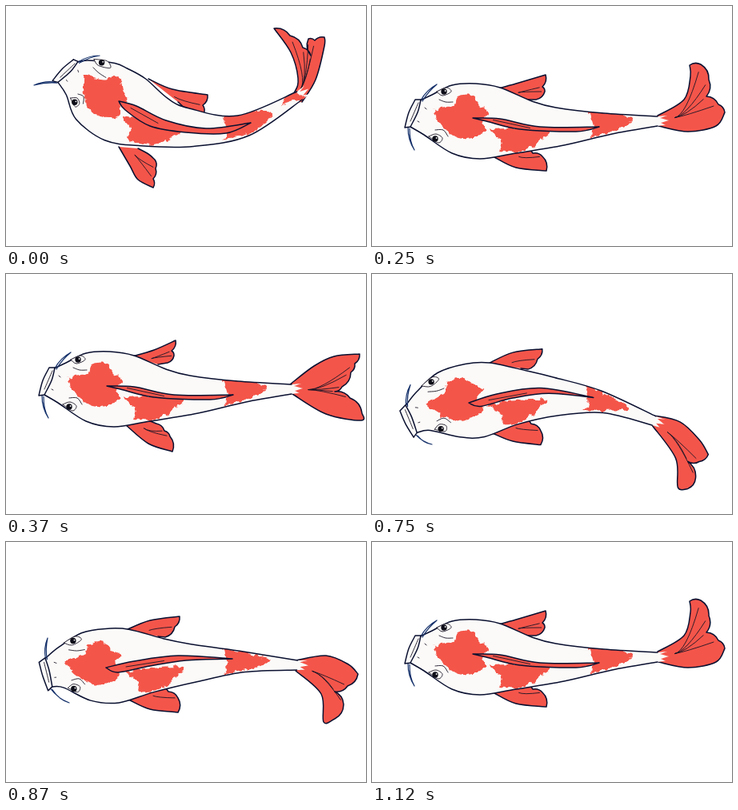
Recreate the animation shown at these times as an HTML page. Size 450 by 300 pixels, loop 1.25 s.

```html
<!DOCTYPE html>
<html lang="en">
<head>
<meta charset="utf-8">
<title>Swimming koi</title>
<style>
html, body { margin: 0; width: 100%; height: 100%; overflow: hidden; background: #fff; }
svg { display: block; width: 100%; height: 100%; }
path { fill: none; stroke-linecap: round; stroke-linejoin: round; }
.ink { stroke: #0a1030; stroke-width: 1.5; }
.thin { stroke: #1b1626; stroke-width: .9; }
.hair { stroke: #14306a; stroke-width: 1.2; }
.red { fill: #f4554a; }
.white { fill: #fbfaf8; }
.pupil { fill: #0d0d18; }
.pose { visibility: hidden; animation: 1250ms step-end infinite; }
.up { animation-name: up; }
.rise { animation-name: rise; }
.lift { animation-name: lift; }
.flat { animation-name: flat; }
.dip { animation-name: dip; }
.down { animation-name: down; }
@keyframes up { 0% { visibility: visible } 9.6%, to { visibility: hidden } }
@keyframes rise { 0% { visibility: hidden } 9.6% { visibility: visible } 20%, to { visibility: hidden } }
@keyframes lift { 0%, 29.6% { visibility: hidden } 20%, 89.6% { visibility: visible } to { visibility: hidden } }
@keyframes flat { 0%, 49.6% { visibility: hidden } 29.6%, 80% { visibility: visible } 89.6%, to { visibility: hidden } }
@keyframes dip { 0%, 60% { visibility: hidden } 49.6%, 69.6% { visibility: visible } 80%, to { visibility: hidden } }
@keyframes down { 0% { visibility: hidden } 60% { visibility: visible } 69.6%, to { visibility: hidden } }
</style>
</head>
<body>
<svg id="stage" viewBox="0 0 450 300">
  <defs>
    <filter id="rough" x="-10%" y="-10%" width="120%" height="120%">
      <feTurbulence type="fractalNoise" baseFrequency=".13" numOctaves="2" seed="4"/>
      <feDisplacementMap in="SourceGraphic" scale="8" xChannelSelector="R" yChannelSelector="G"/>
      <feGaussianBlur stdDeviation=".6"/>
    </filter>
  </defs>
</svg>
<script>
// "x y" pairs; "/" marks a corner, "|" starts a new stroke.
// The body is described once on a straight fish and bent along each pose's spine.
const body = {
  top: '60 118 75 111 100 99 130 97 160 102 200 119 230 127 290 134 357 138',
  tip: '369 137/360 140/371 143/361 146/367 149',
  low: '357 150 300 160 240 174 180 184 135 191 100 184 65 161 48 151',
  lips: '54 117 61 117/57 133 48 151/41 152/46 133 54 117',
  spots: '77 130 101 124 106 115 122 112 135 124 146 134 137 141 141 156 125 165 108 165 93 156 82 143 77 130' +
    '|147 154 180 153 222 156 207 171 188 181 162 181 162 170 147 154' +
    '|270 130 325 140 304 156 272 163 277 156 270 130',
  eyes: '81 107 88 112 99 107 93 102 81 107|71 163 80 160 88 165 83 171 71 163',
  pupils: '90 107 79 166',
  folds: '84 117 92 120 101 120|79 155 89 155 95 163|66 127 68 129|57 144 59 145|48 144 58 121'
};
// Fins and tails run clockwise: leading side / scalloped edge / trailing side.
const up = {
  spine: '72 80 85 89 104 101 135 122 206 148 290 151 333 138 367 112',
  tail: '346 123 361 107 365 90 356 58 335 28/355 37 371 52 381 62 378 41 386 43 398 39/398 50 387 92 370 120',
  upper: '178 91 208 104 252 111/246 124 247 135/232 134 215 120',
  under: '165 178 178 185 186 192/187 203 184 216 184 227/165 217 155 200 141 176',
  dorsal: '141 119 163 125 200 143 250 153 306 146/275 159 225 158 180 150 149 130 141 119',
  whiskers: '117 62 35 99',
  patch: '345 123 358 106 370 112 374 119 358 119 345 123'
};
const rise = {
  spine: '53 113 67 121 89 128 129 141 207 154 287 157 335 147 379 118',
  tail: '364 125 380 112 385 90 373 43/385 47 394 71 405 62 413 57 424 63 432 70/432 77 405 102 380 126',
  upper: '163 101 190 97 226 92/223 106 220 117/205 119 185 113',
  under: '172 186 186 187/190 196 198 202 201 220/175 213 143 188',
  dorsal: '130 133 165 140 220 150 302 150/260 156 190 155 148 146 130 133',
  whiskers: '93 85 22 142'
};
const flat = {
  spine: '48 134 65 137 90 141 130 144 210 150 290 148 325 146 357 144',
  tail: '355 138 385 115 410 103 442 100/436 112 431 123 420 141 411 147 430 155 445 174/444 183 400 175 358 150',
  upper: '158 103 185 95 212 83/207 96 210 102 202 111/190 113',
  under: '178 183 188 187/198 196 205 203 208 222/178 212 150 189',
  dorsal: '126 140 160 141 210 151 284 151/255 157 185 154 143 144 126 140',
  whiskers: '81 98 53 180'
};
const lift = {
  ...flat,
  tail: '357 137 390 117 398 88 397 74/411 73 421 92 418 113 433 123 441 133/430 150 395 157 358 150',
  upper: '158 103 180 97 217 86/213 101 216 107 205 117/195 117',
  under: '198 180 201 184/213 188 218 206/180 202 153 189'
};
const dip = {
  spine: '48 167 63 160 90 157 130 155 210 151 290 150 327 153 364 154',
  tail: '362 148 400 142 428 153 440 165/427 180 411 187 422 203 411 221/397 225 394 190 362 161',
  upper: '150 110 180 98 217 93/211 106 199 119/190 118',
  under: '198 180 203 187/215 195 215 213/180 209 155 198',
  dorsal: '125 157 160 149 215 142 283 146/225 148 180 155 140 163 125 157',
  whiskers: '52 120 79 201'
};

const same = p => p;
// Curls head and tail downward around the middle of the body.
const curl = ([x, y]) => {
  const d = (x - 190) ** 2;
  return [x - 4 - (x > 190 ? d * .00025 : 0), y + d * .00097];
};
const lerp = (a, b, t) => [a[0] + (b[0] - a[0]) * t, a[1] + (b[1] - a[1]) * t];
const at = p => p.map(v => v.toFixed(1)).join(' ');

function pairs(text, warp) {
  const n = text.match(/\d+/g).map(Number), out = [];
  for (let i = 0; i < n.length; i += 2) out.push(warp([n[i], n[i + 1]]));
  return out;
}

// Bezier handles of a Catmull-Rom segment.
function handles(p, i) {
  const a = p[i], b = p[i + 1], before = p[i - 1] || a, after = p[i + 2] || b;
  return [a, [0, 1].map(k => a[k] + (b[k] - before[k]) / 6),
    [0, 1].map(k => b[k] - (after[k] - a[k]) / 6), b];
}

const spline = p => p.slice(1).map((_, i) => 'C' + handles(p, i).slice(1).map(at).join(' ')).join('');

const curve = (text, warp) => text.split('|').map(stroke => {
  let pen, d = '';
  for (const part of stroke.split('/')) {
    const p = pairs(part, warp);
    if (pen) p.unshift(pen);
    else d = 'M' + at(p[0]);
    d += spline(p);
    pen = p[p.length - 1];
  }
  return d;
}).join('');

function along(knots, i, t) {
  const [a, b, c, d] = handles(knots, i);
  const ab = lerp(a, b, t), bc = lerp(b, c, t), cd = lerp(c, d, t);
  const l = lerp(ab, bc, t), r = lerp(bc, cd, t);
  return { p: lerp(l, r, t), angle: Math.atan2(r[1] - l[1], r[0] - l[0]) };
}

const rest = pairs(flat.spine, same);
function bend(knots) {
  return ([x, y]) => {
    let i = 0;
    while (i < rest.length - 2 && x > rest[i + 1][0]) i++;
    const t = Math.min(1, Math.max(0, (x - rest[i][0]) / (rest[i + 1][0] - rest[i][0])));
    const from = along(rest, i, t), to = along(knots, i, t);
    const turn = to.angle - from.angle, c = Math.cos(turn), s = Math.sin(turn);
    const dx = x - from.p[0], dy = y - from.p[1];
    return [to.p[0] + dx * c - dy * s, to.p[1] + dx * s + dy * c];
  };
}

function fin(text, warp) {
  const [lead, edge, trail] = text.split('/').map(part => pairs(part, warp));
  const tip = lead[lead.length - 1], end = edge[edge.length - 1];
  let pen = tip, shape = 'M' + at(lead[0]) + spline(lead);
  for (const e of edge) {
    const m = lerp(pen, e, .5);
    shape += 'Q' + at([m[0] + (e[1] - pen[1]) * .3, m[1] - (e[0] - pen[0]) * .3]) + ' ' + at(e);
    pen = e;
  }
  shape += spline([end, ...trail]);
  const mid = p => p[p.length >> 1];
  const base = lerp(lead[0], trail[trail.length - 1], .5);
  const bow = lerp(mid(lead.slice(0, -1)), trail.length > 1 ? mid(trail.slice(0, -1)) : trail[0], .5);
  const rays = edge.slice(0, -1).map(e =>
    'M' + at(lerp(base, bow, .6)) + 'Q' + at(bow) + ' ' + at(lerp(bow, e, .85))).join('');
  return `<path class="red ink" d="${shape}"/><path class="thin" d="${rays}"/>`;
}

function draw(name, pose, warp = same) {
  const rig = bend(pairs(pose.spine, warp));
  const path = (cls, text, by = rig) => `<path class="${cls}" d="${curve(text, by)}"/>`;
  const skin = [body.top, body.tip, body.low].join('/');
  const pupils = pairs(body.pupils, rig).map(([x, y]) =>
    `<circle class="pupil" cx="${x}" cy="${y}" r="3.7"/><circle fill="#fff" cx="${x + 1.6}" cy="${y - 1}" r=".9"/>`).join('');
  const d = pairs(pose.dorsal, warp), n = d.length;
  const ridge = 'M' + at(lerp(d[1], d[n - 2], .5)) + 'L' + at(lerp(d[2], d[n - 3], .5));
  const ends = pairs(pose.whiskers, warp);
  const whiskers = pairs('61 118 45 152', rig).map((p, i) => {
    const q = ends[i], m = lerp(p, q, .5), k = i ? .15 : -.15;
    const bow = [m[0] + (p[1] - q[1]) * k, m[1] + (q[0] - p[0]) * k];
    return `M${at(p)}Q${at(bow)} ${at(q)}M${at([p[0] + 2, p[1] + 1])}Q${at([bow[0] + 2, bow[1] + 2])} ${at(q)}`;
  }).join('');
  return `<g class="pose ${name}">
    <clipPath id="skin-${name}"><path d="${curve(skin, rig)}"/></clipPath>
    ${fin(pose.upper, warp)}${fin(pose.under, warp)}${fin(pose.tail, warp)}${path('white', skin)}
    <g clip-path="url(#skin-${name})"><g filter="url(#rough)">
      ${path('red', body.spots)}${pose.patch ? path('red', pose.patch, warp) : ''}</g></g>
    ${path('ink', body.top + '|' + body.low)}${path('red ink', pose.dorsal, warp)}
    <path class="thin" d="${ridge}"/><path class="hair" d="${whiskers}"/>
    ${path('white ink', body.lips)}${path('white thin', body.eyes)}${pupils}${path('thin', body.folds)}
  </g>`;
}

document.getElementById('stage').insertAdjacentHTML('beforeend',
  draw('up', up) + draw('rise', rise) + draw('lift', lift) +
  draw('flat', flat) + draw('dip', dip) + draw('down', dip, curl));
</script>
</body>
</html>
```
